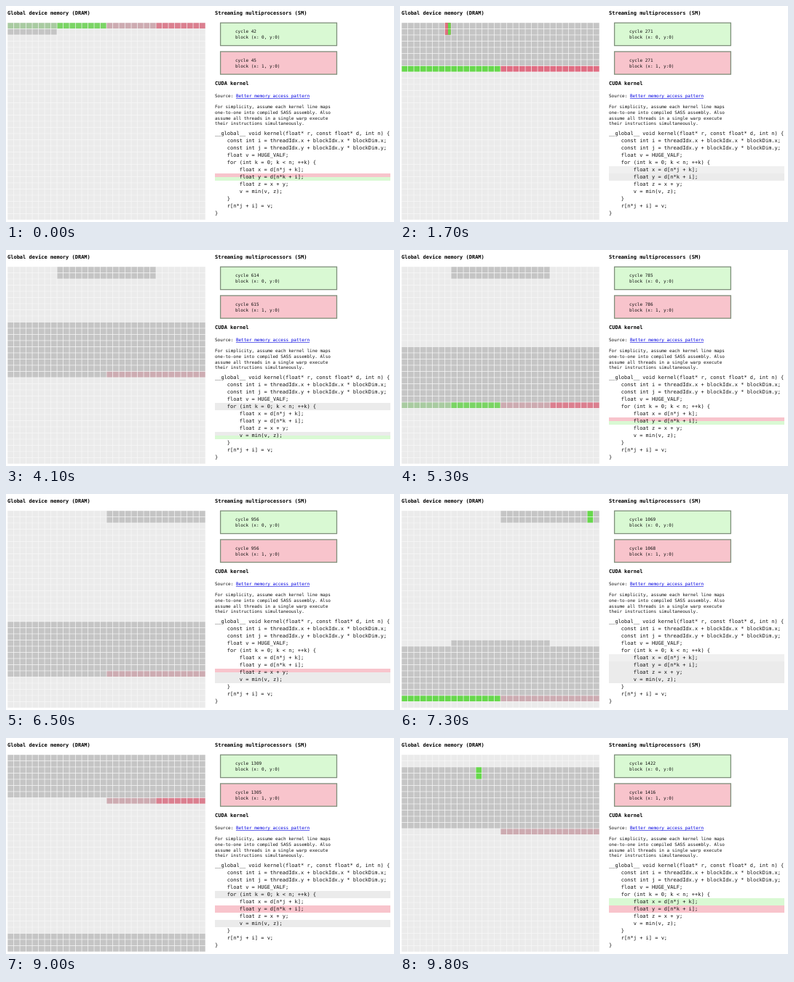
Animation of 533x298 px, one loop 9.9 s. Source, as an HTML page:

```html
<!DOCTYPE html>
<html lang="en">
<head>
<meta charset="utf-8">
<title>Memory access</title>
<style>
html, body { margin: 0; width: 100%; height: 100%; overflow: hidden; background: #fff; }
svg { display: block; width: 100%; height: 100%; }
text { font-family: "DejaVu Sans Mono", monospace; font-size: 6px; white-space: pre; fill: #111; }
.title { font-size: 7px; font-weight: bold; fill: #000; }
.code { font-size: 7px; }
.link { fill: #0000e0; text-decoration: underline; }
</style>
</head>
<body>
<svg id="stage" viewBox="0 0 533 298"></svg>
<script>
const stage = document.getElementById('stage');
const N = 32, PITCH = 8.5, GX = 2.1, GY = 23, CAPACITY = 40;
const LIGHT = '#ebebeb', CACHED = '#c5c5c5', BROWN = '#b1653f';
const COLORS = ['#67d84c', '#e06d82'];
const TINTS = ['#d9f9d3', '#f8c4cc'];
const FAINT = ['#e1efdf', '#f4d8dc'];
const LINE = { i: 1, j: 2, init: 3, loop: 4, x: 5, y: 6, z: 7, min: 8, store: 10 };
const STORE_AT = 32, SECOND = 33;   // second warp starts at step 33

// frame, cycle and loop progress of each block
const KEYS = [
  [0, 42, 45, 0.1, 0.1],
  [17, 271, 271, 7.3, 7.3],
  [26, 399, 401, 11.23, 11.23],
  [41, 614, 615, 17.63, 17.72],
  [65, 956, 956, 26.56, 26.48],
  [82, 1196, 1193, 34.63, 35.15],
  [98, 1422, 1416, 44.9, 45.04]
];

function el(tag, attrs, parent = stage, text = '') {
  const e = document.createElementNS('http://www.w3.org/2000/svg', tag);
  for (const a in attrs) e.setAttribute(a, attrs[a]);
  e.textContent = text;
  parent.appendChild(e);
  return e;
}
const label = (x, y, text, cls = '') => el('text', { x, y, class: cls }, stage, text);
const box = (parent, x, y, width, height, fill) => el('rect', { x, y, width, height, fill }, parent);

function mix(a, b, t) {
  const part = (c, i) => parseInt(c.slice(i, i + 2), 16);
  return 'rgb(' + [1, 3, 5].map(i => Math.round(part(a, i) * (1 - t) + part(b, i) * t)) + ')';
}

// static parts
label(2, 12.3, 'Global device memory (DRAM)', 'title');
label(287, 12.3, 'Streaming multiprocessors (SM)', 'title');
label(287, 109.3, 'CUDA kernel', 'title');
const cycles = [0, 1].map(b => {
  const y = 23.3 + b * 39.6;
  el('rect', { x: 294.6, y, width: 159.8, height: 31.3, fill: TINTS[b], stroke: '#80917c', 'stroke-width': 1.3 });
  label(315, y + 22.1, `block (x: ${b}, y:0)`);
  return label(315, y + 13.7, '');
});
label(287, 126.2, 'Source: ');
label(315.9, 126.2, 'Better memory access pattern', 'link');
['For simplicity, assume each kernel line maps',
 'one-to-one into compiled SASS assembly. Also',
 'assume all threads in a single warp execute',
 'their instructions simultaneously.'].forEach((s, i) => label(287, 141.2 + i * 7.7, s));

const marks = el('g', {});
`__global__ void kernel(float* r, const float* d, int n) {
    const int i = threadIdx.x + blockIdx.x * blockDim.x;
    const int j = threadIdx.y + blockIdx.y * blockDim.y;
    float v = HUGE_VALF;
    for (int k = 0; k < n; ++k) {
        float x = d[n*j + k];
        float y = d[n*k + i];
        float z = x + y;
        v = min(v, z);
    }
    r[n*j + i] = v;
}`.split('\n').forEach((s, i) => label(287, 178 + i * 10, s, 'code'));

box(stage, GX, GY, N * PITCH, N * PITCH, '#f7f7f7');
const cells = [];
for (let n = 0; n < N * N; n++) {
  cells.push(box(stage, GX + n % N * PITCH + 0.3, GY + (n / N | 0) * PITCH + 0.3, PITCH - 0.7, PITCH - 0.7, LIGHT));
}
const extras = el('g', {});

function values(frame) {
  let n = 0;
  while (n < KEYS.length - 2 && frame >= KEYS[n + 1][0]) n++;
  const a = KEYS[n], b = KEYS[n + 1], t = (frame - a[0]) / (b[0] - a[0]);
  return a.map((v, i) => v + (b[i] - v) * t);
}

// least recently used cache of eight-cell lines
function cacheAt(u) {
  const lru = [];
  const touch = id => {
    const at = lru.indexOf(id);
    if (at >= 0) lru.splice(at, 1);
    lru.push(id);
    if (lru.length > CAPACITY) lru.shift();
  };
  for (let s = 0; s < 46; s++) {
    if (s === STORE_AT) continue;
    const late = s >= SECOND, k = late ? s - SECOND : s, row = late ? 2 : 0;
    if (Math.max(...u) >= s - 0.2) [row, row + 1].forEach(r => touch(r * 4 + (k >> 3)));
    [0, 3, 1, 2].forEach(c => { if (u[c >> 1] >= s + 0.45) touch(k * 4 + c); });
  }
  return lru;
}

// what one block does at progress u
function stateOf(u, b) {
  const tint = TINTS[b], step = Math.floor(u), p = u - step;
  if (step === STORE_AT) {
    const line = p < 0.25 ? LINE.store : p < 0.4 ? LINE.i : p < 0.55 ? LINE.j
      : p < 0.7 ? LINE.init : p < 0.8 ? LINE.loop : LINE.x;
    return { lines: { [line]: tint }, row: -1, col: p < 0.8 ? -1 : 0, warp: 2, p };
  }
  const late = step >= SECOND, k = late ? step - SECOND : step;
  const s = { lines: {}, row: k, col: -1, warp: late ? 2 : 0, p, power: 0 };
  if (p < 0.12) {
    s.lines[LINE.y] = tint;
    s.power = 0.3;
  } else if (p < 0.45) {
    s.power = 1;
    s.col = k;
    s.lines[LINE.y] = p < 0.2 ? tint : p < 0.28 ? FAINT[b] : LIGHT;
    if (p >= 0.2) s.lines[LINE.x] = '#f0f0f0';
  } else if (p < 0.53) {
    s.lines[LINE.z] = tint;
  } else if (p < 0.6) {
    s.lines[LINE.z] = s.lines[LINE.min] = LIGHT;
  } else if (p < 0.68) {
    s.lines[LINE.min] = tint;
  } else if (p < 0.8) {
    s.lines[LINE.loop] = s.lines[LINE.min] = LIGHT;
  } else if (k < N - 1) {
    s.lines[LINE.x] = tint;
    s.col = k + 1;
  } else {
    s.lines[LINE.loop] = tint;
  }
  if (p >= 0.45 && p < (b ? 0.8 : 0.53)) s.power = 0.28;
  return s;
}

function drawMarks(states) {
  marks.replaceChildren();
  for (let n = 1; n < 11; n++) {
    const [low, top] = states.map(s => s.lines[n]), y = 171 + n * 10;
    if (low && top) {
      box(marks, 287, y, 241, 5, top);
      box(marks, 287, y + 5, 241, 5, low);
    } else if (low || top) {
      box(marks, 287, y, 241, 10, low || top);
    }
  }
}

function drawCells(states, u) {
  const fills = new Array(N * N).fill(LIGHT);
  cacheAt(u).forEach(id => fills.fill(CACHED, id * 8, id * 8 + 8));
  extras.replaceChildren();
  states.forEach((s, b) => {
    if (s.row < 0 || !s.power) return;
    for (let c = b * 16; c < b * 16 + 16; c++) {
      const arrived = s.p > 0.08 && s.p < 0.12 && (c >> 3) % 2;
      fills[s.row * N + c] = mix(CACHED, COLORS[b], arrived ? 0.8 : s.power);
    }
    if (s.p >= 0.12 && s.p < 0.18) {
      box(extras, GX + b * 16 * PITCH, GY + (s.row + 1) * PITCH - 1.6, 16 * PITCH, 1.3, BROWN);
    }
  });
  const [a, b] = states;
  const shared = a.col >= 0 && a.col === b.col && a.warp === b.warp;
  states.forEach((s, n) => {
    if (s.col < 0) return;
    for (let r = s.warp; r < s.warp + 2; r++) {
      const at = r * N + s.col;
      fills[at] = shared ? BROWN : COLORS[n];
      if (shared && s.p >= 0.25) {
        box(extras, GX + s.col * PITCH + (n ? 0.3 : 4.2), GY + r * PITCH + 0.3, 3.9, 7.8, COLORS[n]);
      }
    }
  });
  fills.forEach((f, i) => cells[i].setAttribute('fill', f));
}

let shown = -1;
function draw(now) {
  const frame = Math.floor(now % 9900 / 100);
  if (frame !== shown) {
    shown = frame;
    const v = values(frame), u = v.slice(3);
    const states = u.map(stateOf);
    cycles.forEach((c, b) => { c.textContent = 'cycle ' + Math.round(v[b + 1]); });
    drawMarks(states);
    drawCells(states, u);
  }
}
const start = performance.now();
function tick() {
  draw(performance.now() - start);
  requestAnimationFrame(tick);
}
tick();
</script>
</body>
</html>
```
